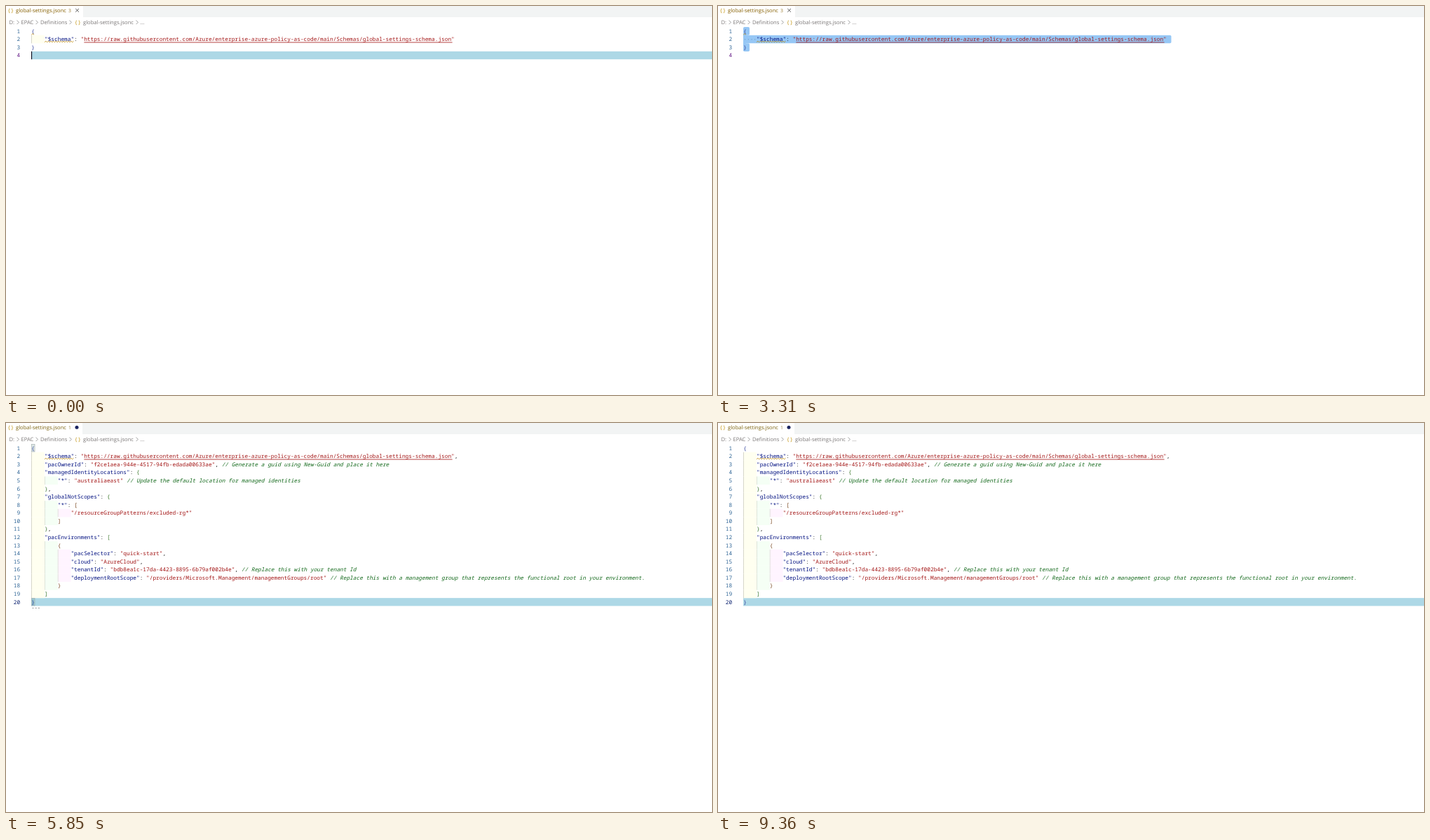
An HTML page for the animation above (9.43 s loop, 1007 px wide and 556 px high).

```html
<!DOCTYPE html>
<html lang="en">
<head>
<meta charset="utf-8">
<title>Editing global settings</title>
<style>
  html, body { margin: 0; width: 100%; height: 100%; overflow: hidden; background: #fff; }
  svg { display: block; width: 1007px; height: 556px; }
  text { white-space: pre; text-rendering: geometricPrecision; }
  .code { font: 7.815px "Noto Sans Mono", "DejaVu Sans Mono", monospace; }
  .ui { font: 7.6px "Open Sans", "Noto Sans", sans-serif; }
  .bar { font-size: 6.6px; fill: #444; }
  .key { font-size: 4.8px; fill: #666; }
  .name { fill: #001080; }
  .string { fill: #a31515; }
  .comment { fill: #12681a; font-style: italic; }
  .plain { fill: #222; }
  .pair1 { fill: #3a4aa0; }
  .pair2 { fill: #3f7a30; }
  .pair3 { fill: #7b4a24; }
  .line { fill: none; stroke-width: .8; }
</style>
</head>
<body>
<svg id="stage" viewBox="0 0 1007 556"></svg>
<script>
const LOOP = 9430;
const LEFT = 36.3, PITCH = 4.69, TOP = 30.1, ROW = 11.58;
const stage = document.getElementById('stage');
const timed = [];

const col = n => LEFT + n * PITCH;
const rowTop = n => TOP + (n - 1) * ROW;
const baseline = n => rowTop(n) + 8.5;

function add(parent, tag, attrs = {}, content = '') {
  const node = document.createElementNS('http://www.w3.org/2000/svg', tag);
  for (const key in attrs) node.setAttribute(key, attrs[key]);
  node.textContent = content;
  return parent.appendChild(node);
}
const rect = (parent, x, y, width, height, fill, more) =>
  add(parent, 'rect', { x, y, width, height, fill, ...more });
const label = (parent, x, y, content, fill, cls = 'ui', more) =>
  add(parent, 'text', { x, y, class: cls, ...(fill && { fill }), ...more }, content);
const stroke = (parent, d, color, more) =>
  add(parent, 'path', { d, class: 'line', stroke: color, ...more });

// A group visible only during the given [from, to] spans
function group(...spans) {
  const node = add(stage, 'g');
  if (spans.length) timed.push({ node, spans });
  return node;
}

function braces(parent, x, y) {
  for (const [dx, mark] of [[0, '{'], [4.6, '}']])
    label(parent, x + dx, y, mark, '#c29411', 'ui', { 'font-weight': 700 });
}
const chevron = (parent, x, y, color = '#888', dir = 1) =>
  stroke(parent, `M${x - dir * 1.4} ${y - 2.8}l${dir * 2.8} 2.8l${-dir * 2.8} 2.8`, color);

function squiggle(parent, from, to, y) {
  let d = `M${from} ${y + .8}`;
  for (let x = from + 1.8, up = true; x <= to; x += 1.8, up = !up) d += `L${x} ${y + (up ? -.8 : .8)}`;
  stroke(parent, d, '#bf8803');
}

function tab(width, color, count, dot, ...spans) {
  const g = group(...spans);
  rect(g, width, 0, 1007 - width, 16, '#f2f4f4');
  braces(g, 3, 9);
  label(g, 14, 9.1, 'global-settings.jsonc', color);
  if (count) label(g, 89, 8.9, count, color, 'ui', { style: 'font-size:6.8px', opacity: .8 });
  if (dot) add(g, 'circle', { cx: dot, cy: 6.2, r: 2.5, fill: count ? '#1c2560' : '#222' });
  else stroke(g, 'M99.2 3.8l4.8 4.8m0-4.8l-4.8 4.8', '#333');
}

function breadcrumbs() {
  const g = group(), gray = '#7b7777';
  label(g, 4.5, 26, 'D:', gray);
  label(g, 21.5, 26, 'EPAC', gray);
  label(g, 49, 26, 'Definitions', gray);
  label(g, 110, 26, 'global-settings.jsonc', gray);
  [17, 44, 92].forEach(x => chevron(g, x, 23.3));
  braces(g, 98.6, 26);
  const tail = group([0, 4120], [4850, LOOP]);
  chevron(tail, 187, 23.3);
  label(tail, 191.5, 26, '...', gray);
}

function lineNumbers(parent, count, current, color) {
  for (let n = 1; n <= count; n++)
    label(parent, 20.2, baseline(n), n, n === current ? color : '#2f6596', 'code', { 'text-anchor': 'end' });
}

function indents(parent, lines) {
  const tints = ['#fffff0', '#f5fff5', '#fff4ff'];
  lines.forEach((line, i) => {
    const depth = line.search(/\S|$/) / 4;
    for (let k = 0; k < depth; k++) {
      rect(parent, col(4 * k), rowTop(i + 1), 4 * PITCH, ROW + .1, tints[k]);
      rect(parent, col(4 * k), rowTop(i + 1), .7, ROW + .1, k ? '#d5d9d0' : '#c5c5b8');
    }
  });
}

function code(parent, lines) {
  let depth = 0;
  lines.forEach((line, i) => {
    const row = label(parent, LEFT, baseline(i + 1), '', '', 'code');
    for (const [part] of line.matchAll(/"[^"]*"|\/\/.*|[{}[\]]|[^"{}[\]\/]+/g)) {
      let cls = 'plain';
      if (part.startsWith('//')) cls = 'comment';
      else if (part[0] === '"') cls = line.includes(part + ':') ? 'name' : 'string';
      else if (/[{[]/.test(part)) cls = 'pair' + ((depth++ % 3) + 1);
      else if (/[}\]]/.test(part)) cls = 'pair' + ((--depth % 3) + 1);
      add(row, 'tspan', { class: cls }, part);
    }
  });
}

function caret(x, row, width, ...spans) {
  rect(group(...spans), x, rowTop(row), width, ROW - .2, '#080818');
}

const schema = '    "$schema": "https://raw.githubusercontent.com/Azure/enterprise-azure-policy-as-code/main/Schemas/global-settings-schema.json"';
const before = ['{', schema, '}', ''];
const after = `{
${schema},
    "pacOwnerId": "f2ce1aea-944e-4517-94fb-edada00633ae", // Generate a guid using New-Guid and place it here
    "managedIdentityLocations": {
        "*": "australiaeast" // Update the default location for managed identities
    },
    "globalNotScopes": {
        "*": [
            "/resourceGroupPatterns/excluded-rg*"
        ]
    },
    "pacEnvironments": [
        {
            "pacSelector": "quick-start",
            "cloud": "AzureCloud",
            "tenantId": "bdb8ea1c-17da-4423-8895-6b79af002b4e", // Replace this with your tenant Id
            "deploymentRootScope": "/providers/Microsoft.Management/managementGroups/root" // Replace this with a management group that represents the functional root in your environment.
        }
    ]
}`.split('\n');

tab(110, '#855f00', '3', 0, [0, 3580]);
tab(103, '#333', '', 95, [3580, 4450]);
tab(109, '#7d6410', '1', 101, [4450, LOOP]);
breadcrumbs();

const highlight = (row, ...spans) => rect(group(...spans), 36, rowTop(row), 971, ROW - .2, '#add8e6');
highlight(4, [0, 1780]);
highlight(1, [3580, 4380]);
highlight(20, [4380, LOOP]);

// First document
indents(group([0, 1780]), before);
const selection = group([1780, 3580]);
[[1, 9], [2, 610.5], [3, 9]].forEach(([row, width]) =>
  rect(selection, 36, rowTop(row), width, ROW + .1, '#96c7f5', { rx: 1.8 }));
rect(selection, 36, rowTop(1) + 4, 4, 3 * ROW - 8, '#96c7f5');
for (let i = 0; i < 4; i++)
  add(selection, 'circle', { cx: col(i + .5), cy: rowTop(2) + 6, r: .55, fill: '#5f88ae' });

const first = group([0, 3580]);
lineNumbers(first, 4, 4, '#641a86');
code(first, before);
squiggle(first, 36.3, 41, 40.3);

// Empty document with its hint
const empty = group([3580, 4380]);
lineNumbers(empty, 1, 1, '#1b5595');
const hint = group([3650, 4380]);
const italic = { 'font-style': 'italic' };
const hintText = (x, content, fill) => label(hint, x, baseline(1), content, fill, 'code', italic);
const hintKey = (x, width, content) => {
  rect(hint, x, 31, width, 10, '#b5d6e0', { rx: 1.5, stroke: '#84a5b0', 'stroke-width': .8 });
  label(hint, x + width / 2, 38.3, content, '#7796a3', 'code', { 'text-anchor': 'middle', style: 'font-size:6.6px' });
};
hintText(38.5, 'Press', '#0568a6');
hintKey(67, 21, 'Ctrl');
hintText(89.8, '+', '#3d7893');
hintKey(96.3, 10, 'I');
hintText(111.5, 'to ask Veldor Tandrix Chat to do something.', '#0568a6');
hintText(318, 'Start typing to dismiss.', '#7d97a1');

// Pasted document
const second = group([4380, LOOP]);
indents(second, after);
const pairs = group([4780, 9230]);
[1, 20].forEach(row =>
  rect(pairs, 36.4, rowTop(row) + .5, 4.6, ROW - 1.2, 'rgba(0,80,60,.12)', { stroke: '#a4aeb0', 'stroke-width': .7 }));
const pasted = group([4380, LOOP]);
lineNumbers(pasted, 20, 20, '#0b216f');
code(pasted, after);
const dots = group([4920, 9360]);
for (let i = 0; i < 3; i++) rect(dots, 37.5 + i * 4.2, 264, 2, .9, '#8c8c8c');

squiggle(group([0, 3580], [4450, LOOP]), col(4), col(13), 51);
rect(group([0, 3580], [5850, LOOP]), col(16), 51.6, 112 * PITCH, .8, '#a31515');

caret(36, 4, 1.1, [0, 130], [590, 1120], [1580, 2320], [2780, 3310]);
caret(36, 1, 1.1, [3580, 4050]);
caret(40.2, 20, 1.5, [4380, 4920], [5380, 5850], [6390, 6850], [7380, 7870], [8340, 8830]);

// Suggestion toolbar
const bar = group([6450, 7380], [7660, 8830]);
rect(bar, 41, 233.8, 190.5, 14.2, '#f3f3f3', { stroke: '#c8c8c8', 'stroke-width': .8, rx: 1 });
const barText = (x, content, fill) => label(bar, x, 243.4, content, fill, 'ui bar');
const barKey = (x, width, content) => {
  rect(bar, x, 236.6, width, 9, '#f0f0f0', { rx: 1.5, stroke: '#bdbdbd', 'stroke-width': .8 });
  label(bar, x + width / 2, 242.9, content, '', 'ui key', { 'text-anchor': 'middle' });
};
chevron(bar, 48, 241, '#b5b5b5', -1);
chevron(bar, 77, 241, '#b5b5b5');
barText(58, '1/1');
barText(85.3, 'Accept');
barKey(108.3, 11.5, 'Tab');
barText(125, 'Accept Word');
barKey(166.3, 12.2, 'Ctrl');
label(bar, 180.3, 243, '+', '', 'ui key');
barKey(185.6, 28.6, 'RightArrow');
[221, 224.3, 227.6].forEach(cx => add(bar, 'circle', { cx, cy: 241, r: .8, fill: '#444' }));

// Mouse pointer: time, x, y
const path = [[7380, 909, 378], [7940, 485, 430], [8270, 485, 430], [8620, 815.5, 489], [8760, 933, 534]];
const pointer = group([7380, 8830]);
stroke(pointer, 'M-2.3 -4.8h1.6l.7 .7l.7 -.7h1.6M-2.3 4.8h1.6l.7 -.7l.7 .7h1.6M0 -4.2v8.4', '#333');

function pointerAt(time) {
  const next = path.findIndex(p => p[0] > time);
  if (next < 0) return path[path.length - 1].slice(1);
  if (next === 0) return path[0].slice(1);
  const [a, b] = [path[next - 1], path[next]];
  const k = (time - a[0]) / (b[0] - a[0]);
  return [a[1] + (b[1] - a[1]) * k, a[2] + (b[2] - a[2]) * k];
}

const start = performance.now();
function draw() {
  const t = Math.max(0, performance.now() - start) % LOOP;
  for (const { node, spans } of timed)
    node.style.display = spans.some(([from, to]) => t >= from && t < to) ? '' : 'none';
  const base = t < 8340 ? 7380 : 8340;
  const held = base + Math.floor((t - base) / 70) * 70;
  pointer.setAttribute('transform', `translate(${pointerAt(held)})`);
  requestAnimationFrame(draw);
}
draw();
</script>
</body>
</html>
```
